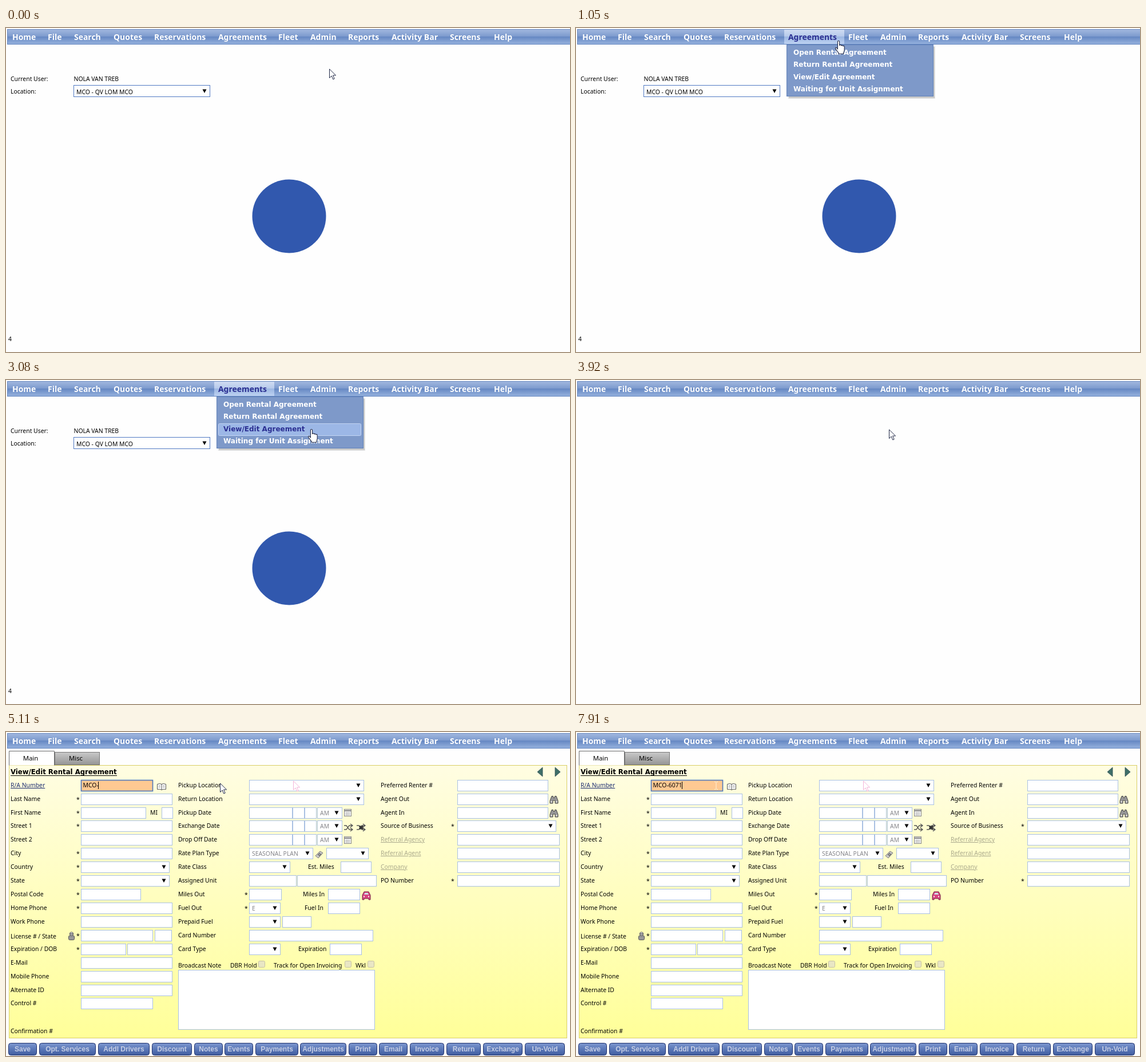
An HTML page that plays this animation: 986x568 px, repeating every 8 s.

```html
<!DOCTYPE html>
<html lang="en">
<head>
<meta charset="utf-8">
<title>Rental agreement lookup</title>
<style>
html, body { margin: 0; width: 100%; height: 100%; overflow: hidden; background: #fefefe; }
svg { display: block; font: 10.4px 'Noto Sans', 'Open Sans', sans-serif; }
text { white-space: pre; }
.nav { font-size: 13.95px; font-weight: 700; fill: #fff; }
.on { fill: #2b2f92; }
.bold { font: 700 11.7px 'DejaVu Sans', sans-serif; }
.item { font: 700 12px 'DejaVu Sans', sans-serif; }
.button { font: 700 12px 'Liberation Sans', sans-serif; fill: #c6cee4; text-anchor: middle; }
.tab { font-size: 11.4px; text-anchor: middle; }
.link { fill: #1c2c70; text-decoration: underline; }
.faint { fill: #aaa98c; text-decoration: underline; }
.grey { fill: #85858a; }
.field { fill: #fff; stroke: #a9c0e2; }
</style>
</head>
<body>
<svg id="stage" width="986" height="568" viewBox="0 0 986 568"></svg>
<script>
const LOOP = 8000, STEP = 70;
const stage = document.getElementById('stage');

const text = (x, y, s, cls = '', attrs = '') => `<text x="${x}" y="${y}" class="${cls}" ${attrs}>${s}</text>`;
const rect = (x, y, w, h, attrs) => `<rect x="${x}" y="${y}" width="${w}" height="${h}" ${attrs}/>`;
const path = (d, attrs = '') => `<path d="${d}" ${attrs}/>`;
const group = (id, body) => `<g id="${id}">${body}</g>`;
const at = (x, y, body) => `<g transform="translate(${x} ${y})">${body}</g>`;
const triangle = (x, y) => path(`M${x - 3.5} ${y - 3}h7l-3.5 6.5z`);
const gradient = (id, ...stops) => `<linearGradient id="${id}" x2="0" y2="1">` +
  stops.map(([o, c]) => `<stop offset="${o}" stop-color="${c}"/>`).join('') + '</linearGradient>';

// Navigation bar and drop-down menu
const navItems = { Home: 11, File: 73, Search: 119, Quotes: 188, Reservations: 259, Agreements: 371,
  Fleet: 476, Admin: 532, Reports: 598, 'Activity Bar': 674, Screens: 776, Help: 853 };
const nav = rect(2.5, 2.5, 990, 26, 'fill="url(#bar)" stroke="#5f82bd"') +
  Object.entries(navItems).map(([s, x]) => text(x, 21, s, 'nav')).join('');

const menuItems = ['Open Rental Agreement', 'Return Rental Agreement', 'View/Edit Agreement', 'Waiting for Unit Assignment'];
const menu = rect(364, 3, 105, 25, 'fill="url(#hover)"') + text(371, 21, 'Agreements', 'nav on') +
  rect(371, 32, 257, 92, 'fill="#000" opacity=".09"') + rect(372, 33, 255, 90, 'fill="#000" opacity=".12"') +
  rect(368.5, 29.5, 256, 90, 'fill="#7e99c9" stroke="#5f80b8"') +
  rect(371.5, 54.5, 249, 21, 'id="row" rx="2" fill="#9cb7e6" stroke="#c3d4f3"') +
  menuItems.map((s, i) => text(380, Math.round(46.6 + 21.6 * i), s, 'item')).join('');

// Start page
const home = text(8, 93, 'Current User:') + text(118.5, 93, 'NOLA VAN TREB') +
  text(8, 115, 'Location:') + rect(118.5, 100.5, 238, 20, 'fill="#fff" stroke="#4f78c2"') +
  text(123, 115.5, 'MCO - QV LOM MCO') + triangle(347, 110.5) + text(4, 549, '4') +
  '<circle cx="495" cy="330" r="64.500" fill="#3158ae"/>';

// Form rows. Tokens: a-b input, a-bv select, a-bv=S select showing S, S@x loose text
function column(x, starX, lines) {
  return lines.map((line, i) => {
    const y = Math.round(83.7 + 23.92 * i) + .5, base = y + 12.5;
    let [label, tokens] = line.split(':');
    let out = '', cls = '';
    if (label.endsWith('*')) { out += text(starX, base + 1, '*'); label = label.slice(0, -1); }
    if (label.startsWith('_')) { cls = 'faint'; label = label.slice(1); }
    out += text(x, base, label, cls);
    for (const token of tokens.split(',')) {
      const [note, noteX] = token.split('@');
      if (noteX) { out += text(noteX, base, note); continue; }
      const [, a, b, select, value] = token.match(/(\d+)-(\d+)(v?)=?(.*)/);
      out += rect(+a + .5, y, b - a, 19, 'class="field"');
      if (select) out += triangle(b - 9, y + 9) + text(+a + 5, base + 1, value, 'grey');
    }
    return out;
  }).join('');
}
const dateRow = '425-500,501-521,522-542,544-587v=AM';
const fields = column(8, 123, [':131-256', 'Last Name*:131-290', 'First Name*:131-244,MI@252,272-291',
  'Street 1*:131-290', 'Street 2:131-290', 'City*:131-290', 'Country*:131-285v', 'State*:131-285v',
  'Postal Code*:131-235', 'Home Phone*:131-290', 'Work Phone:131-290', '*:131-256,260-289',
  'Expiration / DOB*:131-209,212-290', 'E-Mail:131-290', 'Mobile Phone:131-290', 'Alternate ID:131-290',
  'Control #:131-256']) +
  column(301, 417, ['Pickup Location:425-625v', 'Return Location:425-625v', 'Pickup Date:' + dateRow,
  'Exchange Date:' + dateRow, 'Drop Off Date:' + dateRow, 'Rate Plan Type:425-536v=SEASONAL PLAN,560-633v',
  'Rate Class:425-496v,Est. Miles@528,585-638', 'Assigned Unit:425-507,509-647',
  'Miles Out*:425-481,Miles In@519,563-618', 'Fuel Out*:425-479v=E,Fuel In@522,563-618',
  'Prepaid Fuel:425-479v,483-533', 'Card Number:425-641', 'Card Type:425-479v,Expiration@511,566-621']) +
  column(655, 778, ['Preferred Renter #:789-947', 'Agent Out:789-947', 'Agent In:789-947',
  'Source of Business*:789-961v', '_Referral Agency:789-967', '_Referral Agent:789-967', '_Company:789-967',
  'PO Number*:789-967']);

const buttons = [['Save', 4, 54], ['Opt. Services', 58, 157], ['Addl Drivers', 161, 251], ['Discount', 255, 325],
  ['Notes', 329, 379], ['Events', 382, 432], ['Payments', 436, 511], ['Adjustments', 514, 595],
  ['Print', 599, 649], ['Email', 652, 702], ['Invoice', 706, 766], ['Return', 770, 830],
  ['Exchange', 834, 903], ['Un-Void', 907, 977]].map(([s, a, b]) =>
  rect(a + .5, 545.5, b - a - 1, 21, 'rx="4" fill="url(#button)" stroke="#1d2f6b"') +
  text((a + b) / 2, 560, s, 'button')).join('');

const checkBox = x => rect(x + .5, 401.5, 11, 11, 'rx="2" fill="#e9e6c4" stroke="#c5c2a2"');
const form = rect(5.5, 58.5, 975, 478, 'fill="url(#panel)" stroke="#d9ce66"') +
  path('M5.5 58.5v-25h79v25', 'fill="#fff" stroke="#6b6b6b"') + text(43, 49.5, 'Main', 'tab') +
  rect(85.5, 35.5, 78, 22, 'fill="url(#tab)" stroke="#777"') + text(122, 49.5, 'Misc', 'tab') +
  text(8, 74, 'View/Edit Rental Agreement', 'bold') + path('M8 76.5h186', 'stroke="#000"') +
  fields + text(8, 97, 'R/A Number', 'link') + text(8, 362, 'License # / State') + text(8, 528, 'Confirmation #') +
  text(301, 413, 'Broadcast Note') + text(392, 413, 'DBR Hold') + text(468, 413, 'Track for Open Invoicing') +
  text(611, 413, 'Wkl') + [441, 592, 632].map(checkBox).join('') +
  rect(301.5, 417.5, 343, 104, 'class="field"') +
  rect(131.5, 84.5, 125, 19, 'id="number" stroke="#4f78bd"') + text(134.5, 97, '', '', 'id="value"') +
  rect(0, 87, 1, 13, 'id="caret"') + buttons;

// Small icons
const line = 'fill="none" stroke="#555" stroke-width="1.3"';
const binoculars = path('M4 .5h2.500l.5 3h2l.5-3H12l3 8v4.500h-5V8H6v5H1V8.500z', 'fill="#999" stroke="#444"') +
  path('M2.500 10.500h2M11.500 10.500h2', 'stroke="#eee" stroke-width="2.500"');
const calendar = rect(.5, .5, 12, 12, 'fill="#eee" stroke="#888"') + path('M1 3h11', 'stroke="#888" stroke-width="2"') +
  path('M3 6.500h7M3 8.500h7M3 10.500h7', 'stroke="#999" stroke-dasharray="1.500 1"');
const shuffle = path('M0 3h4l5 7h5M0 10h4l5-7h5M11 0l4 3-4 3M11 7l4 3-4 3', line);
const icons = path('M938 62v16l-9-8zM960 62v16l9-8z', 'fill="#3f6f68" stroke="#2a4a50" stroke-width=".8"') +
  at(264, 89, path('M.5 2.500q5-2 7.500 0 2.500-2 7.500 0v9q-5-1-7.500 1-2.500-2-7.500-1zM8 2.500v10', 'fill="#fff" stroke="#555"') +
    path('M2.500 5h3.500M2.500 7.500h3.500M10 5h3.500M10 7.500h3.500', 'stroke="#999"')) +
  at(950, 112, binoculars) + at(950, 136, binoculars) + at(591, 135, calendar) + at(591, 183, calendar) +
  at(591, 161, shuffle) + at(613, 161, shuffle + path('M5 4l6 5M5 9l6-5', 'stroke="#333" stroke-width="3"')) +
  at(540, 208, path('M1 9l8-8 5 3-8 9z', 'fill="#ccc" stroke="#777"') + path('M5 8l4-4M7 9.500l4-4', line)) +
  at(622, 279, path('M1 7l3-6h8l3 6v8h-3v-2h-8v2h-3z', 'fill="#d8447e" stroke="#742848"') +
    path('M4 6l1.500-3h5l1.500 3z', 'fill="#cfe0ea"') + path('M3 9.500h2M11 9.500h2', 'stroke="#fff" stroke-width="2"')) +
  at(109, 350, '<circle cx="5.500" cy="4" r="3.200" fill="#ddd" stroke="#555"/>' +
    rect(.5, 7, 10, 7.5, 'rx="2" fill="#999" stroke="#555"') + path('M3 4h5', 'stroke="#555" stroke-width="1.500"'));

// Pointers, each with its hot spot at 0,0
const arrowShape = 'M.5 1v15.500l3.700-3.500 2.600 6 2.400-1-2.600-6h5z';
const handShape = 'M-1.500 14V2a1.500 1.500 0 0 1 3 0v6.500a1.400 1.400 0 0 1 3 .3 1.400 1.400 0 0 1 2.700.6 1.300 1.300 0 0 1 2.400.6v5' +
  'c0 3-1.500 4-1.500 7H.5c-.500-3-4.500-6-5.500-8.500-.700-2 1.500-2.500 2.200-1z';
const pointers = path(arrowShape, 'id="ghost" transform="translate(502 85)" fill="#fff" stroke="#f3b4d8"') +
  group('pointer', path(arrowShape, 'id="arrow" fill="#fff" stroke="#222a48"') +
    path(handShape, 'id="hand" transform="scale(1.06)" fill="#fff" stroke="#1c2340"') +
    path('M-3-6.500h2l1 1 1-1h2M0-5.500v11M-3 6.500h2l1-1 1 1h2', 'id="beam" fill="none" stroke="#fff0d8"'));

stage.innerHTML = '<defs>' +
  gradient('bar', [0, '#a2b8df'], [.5, '#7a98cc'], [.5, '#6688c3'], [1, '#96b2de']) +
  gradient('hover', [0, '#d0dcf2'], [.5, '#b4c8ea'], [.5, '#9db7e2'], [1, '#bdd2f2']) +
  gradient('panel', [0, '#fffde2'], [1, '#ffff99']) +
  gradient('tab', [0, '#c9c9c9'], [1, '#959595']) +
  gradient('button', [0, '#7d97cf'], [.5, '#5b78b8'], [1, '#3f5c9f']) + '</defs>' +
  nav + group('home', home) + group('form', form) + group('icons', icons) + group('menu', menu) + pointers;

const el = Object.fromEntries([...stage.querySelectorAll('[id]')].map(e => [e.id, e]));
const items = [...stage.querySelectorAll('.item')];
const show = (e, on) => e.setAttribute('visibility', on ? 'visible' : 'hidden');
const within = (t, a, b) => t >= a && t < b;

// Pointer route: time, x, y
const route = [[0, 565, 71], [560, 565, 71], [770, 643, 147], [980, 464, 26], [1050, 459, 22], [1470, 459, 22],
  [1540, 457, 22], [1680, 457, 22], [2100, 458, 58], [2520, 457, 86], [2660, 457, 86], [3150, 547, 86],
  [4620, 547, 86], [4760, 502, 85], [5460, 246, 93], [5530, 245, 93.5], [LOOP, 245, 93.5]];
const keyTimes = [6860, 7000, 7700, 7910];

function locate(t) {
  const i = route.findIndex(p => p[0] > t), [t0, x0, y0] = route[i - 1], [t1, x1, y1] = route[i];
  const k = (t - t0) / (t1 - t0);
  return [x0 + (x1 - x0) * k, y0 + (y1 - y0) * k];
}

function draw(now) {
  const t = Math.floor(now % LOOP / STEP) * STEP;
  const [x, y] = locate(t);
  const loaded = t >= 4410, menuOn = within(t, 980, 3780);
  const handOn = within(t, 980, 3920), beamOn = t > 4690 && x < 257;
  const row = y < 31 ? -1 : Math.floor((y - 32) / 22);

  show(el.home, t < 3920);
  show(el.form, t >= 4340);
  show(el.icons, loaded);
  show(el.menu, menuOn);
  show(el.row, menuOn && row >= 0);
  el.row.setAttribute('y', 32.5 + 22 * Math.max(row, 0));
  items.forEach((item, i) => item.setAttribute('fill', i === row ? '#2b2f92' : '#fff'));

  el.number.setAttribute('fill', loaded ? '#ffc992' : '#fff');
  el.number.setAttribute('stroke-width', loaded ? 1.6 : 1);
  el.value.textContent = 'MCO-' + '6071'.slice(0, keyTimes.filter(k => t >= k).length);
  el.caret.setAttribute('x', Math.round(134 + el.value.getComputedTextLength()));
  show(el.caret, within(t, 4970, 6300) || within(t, 6790, 7420) || t >= 7700);

  show(el.ghost, t > 4760);
  show(el.arrow, !handOn && !beamOn);
  show(el.hand, handOn);
  show(el.beam, beamOn);
  el.pointer.setAttribute('transform', `translate(${Math.round(x)} ${Math.round(y)})`);
}

const start = performance.now();
function tick() {
  draw(performance.now() - start);
  requestAnimationFrame(tick);
}
tick();
</script>
</body>
</html>
```
